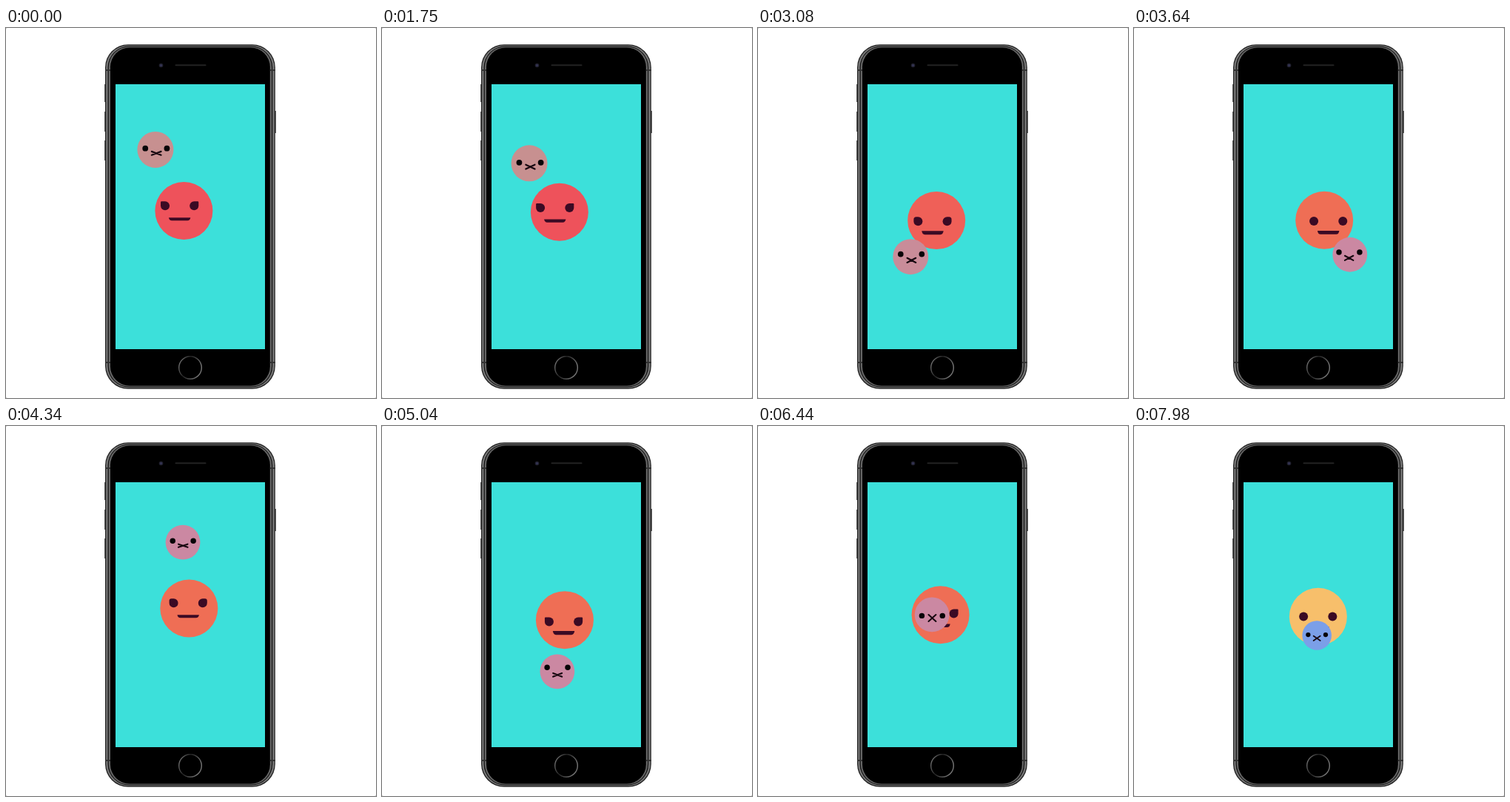
An HTML page for the animation above (8000 ms loop, 500 by 500 pixels).

```html
<!DOCTYPE html>
<html lang="en">
<head>
<meta charset="utf-8">
<title>Two faces</title>
<style>
  html, body { margin: 0; width: 100%; height: 100%; overflow: hidden; background: #fff; }
  svg { display: block; width: 100%; height: 100%; }
</style>
</head>
<body>
<svg viewBox="0 0 500 500">
  <defs>
    <linearGradient id="ring" y2=".4">
      <stop offset="0" stop-color="#888"/>
      <stop offset=".45" stop-color="#222"/>
      <stop offset="1" stop-color="#777"/>
    </linearGradient>
    <clipPath id="screen"><rect x="148" y="76" width="202" height="358"/></clipPath>
  </defs>
  <rect width="500" height="500" fill="#bbb"/>
  <rect width="500" height="500" rx="2" fill="#fff"/>

  <path d="M134 76v24M134 113v27M134 152v27M364 112v30" stroke="#333" stroke-width="1.6"/>
  <rect x="134" y="22.2" width="229.8" height="465.6" rx="31" fill="#222"/>
  <rect x="135.2" y="23.4" width="227.4" height="463.2" rx="30" fill="#777"/>
  <rect x="137.6" y="24.6" width="222.6" height="460.8" rx="28.5" fill="#111"/>
  <rect x="138.8" y="25.4" width="220.2" height="459.2" rx="27.5" fill="#666"/>
  <rect x="141" y="26.6" width="215.8" height="456.8" rx="26" fill="#000"/>
  <path d="M134 57h7M357 57h7M134 452h7M357 452h7" stroke="#333" stroke-width="2"/>
  <circle cx="209.5" cy="50.5" r="2.8" fill="#222230"/>
  <circle cx="209.5" cy="50.5" r="1.2" fill="#3a3a60"/>
  <path d="M229.5 50.2h40" stroke="#232323" stroke-width="2" stroke-linecap="round"/>
  <circle cx="249" cy="459" r="15.3" fill="#000" stroke="url(#ring)" stroke-width="1.4"/>

  <rect x="148" y="76" width="202" height="358" fill="#3ce0da"/>
  <g clip-path="url(#screen)">
    <g id="big" fill="#3b0a24">
      <circle id="bigHead" r="39"/>
      <path id="eyeL"/>
      <path id="eyeR"/>
      <path id="bigMouth"/>
    </g>
    <g id="small" fill="#080407">
      <circle id="smallHead" r="24.5"/>
      <circle id="dotL" r="3.9"/>
      <circle id="dotR" r="3.9"/>
      <path id="cross" fill="none" stroke="#180810" stroke-width="2.2" stroke-linecap="round"/>
    </g>
  </g>
</svg>
<script>
const LOOP = 8000, STEP = 70;

// Turns of the small face round the big one: time, angle from the top, reach.
// A negative reach lies on the far side of the centre.
const orbit = [
  [1400, .63, 1.08], [1750, .79, .95], [2520, 1.53, .97], [3640, 3.83, .91],
  [5040, 9.26, 1], [5600, 11.2, .84], [6440, 11.61, -.23], [7980, 12.51, -.445]
];

const el = id => document.getElementById(id);
const set = (id, attrs) => {
  for (const name in attrs) el(id).setAttribute(name, attrs[name]);
};
const move = (id, x, y) => set(id, { transform: `translate(${x} ${y})` });
const clamp = v => Math.min(1, Math.max(0, v));
const ramp = (t, from, to) => clamp((t - from) / (to - from));
const mix = (a, b, part) => `color-mix(in srgb, ${b} ${part * 100}%, ${a})`;

function spline(keys, t) {
  let i = 0;
  while (i < keys.length - 2 && t >= keys[i + 1][0]) i++;
  const from = keys[i], to = keys[i + 1];
  const u = ramp(t, from[0], to[0]);
  const w = u * u * (3 - 2 * u);
  const slope = (j, k) => {
    const a = keys[Math.max(0, j - 1)], b = keys[Math.min(keys.length - 1, j + 1)];
    return (b[k] - a[k]) / (b[0] - a[0]) * (to[0] - from[0]);
  };
  return [1, 2].map(k => from[k] * (1 - w) + to[k] * w
    + slope(i, k) * u * (1 - u) ** 2 - slope(i + 1, k) * u * u * (1 - u));
}

// Round eye whose outer top corner sharpens as the corner radius shrinks.
function eye(id, x, y, side, corner) {
  const r = 6;
  set(id, {
    d: `M0 ${-r}H${r - corner}A${corner} ${corner} 0 0 1 ${r} ${corner - r}V0`
      + `A${r} ${r} 0 1 1 0 ${-r}Z`,
    transform: `translate(${x} ${y}) scale(${side} 1)`
  });
}

function drawBig(dx, dy, color, corner) {
  move("big", 249 + dx * .187, 255.5 + dy * .09);
  el("bigHead").style.fill = color;
  const lookX = dx * .125, eyeY = dy * .055 - 1.6;
  eye("eyeL", lookX - 19.6, eyeY, -1, corner);
  eye("eyeR", lookX + 19.6, eyeY, 1, corner);
  const h = 4.6 + dy * .006;
  set("bigMouth", { d: `M-14.7 0H14.7Q14 ${h} 10.5 ${h}H-10.5Q-14 ${h} -14.7 0Z` });
  move("bigMouth", lookX, 14.7 + dy * .038 - h / 2);
}

function drawSmall(x, y, color, radius) {
  set("small", { transform: `translate(${x} ${y}) scale(${radius / 24.5})` });
  el("smallHead").style.fill = color;
  const shift = (248 - x) * .02, off = Math.abs(y - 250);
  const dotY = 2 - off * (y < 250 ? .044 : .095);
  set("dotL", { cx: shift - 14.6, cy: dotY });
  set("dotR", { cx: shift + 14.6, cy: dotY });
  const w = 5.1 + off * .015, v = 4.8 - off * .028;
  set("cross", { d: `M${-w} ${-v}L${w} ${v}M${w} ${-v}L${-w} ${v}` });
  move("cross", shift * 1.4, 4.8);
}

function draw(t) {
  const [angle, reach] = spline(orbit, t);
  const x = 249 - Math.sin(angle) * reach * 74;
  const y = 243 - Math.cos(angle) * reach * 90;

  const calm = ramp(t, 2520, 3640), glow = ramp(t, 6440, 7980);
  const roundness = Math.max(glow, clamp(1 - Math.abs(t - 3640) / 1100));
  drawBig(x - 248, y - 258, mix(mix("#ee525b", "#ef6e55", calm), "#f7bf6b", glow), 1.2 + roundness * 4.8);
  drawSmall(x, y, mix(mix("#c79090", "#cb88a2", calm), "#7b9fe8", glow), 24.5 - calm * 1.1 - glow * 3.6);
}

function tick() {
  const t = performance.now() % LOOP;
  draw(Math.floor(t / STEP) * STEP);
  requestAnimationFrame(tick);
}
tick();
</script>
</body>
</html>
```
